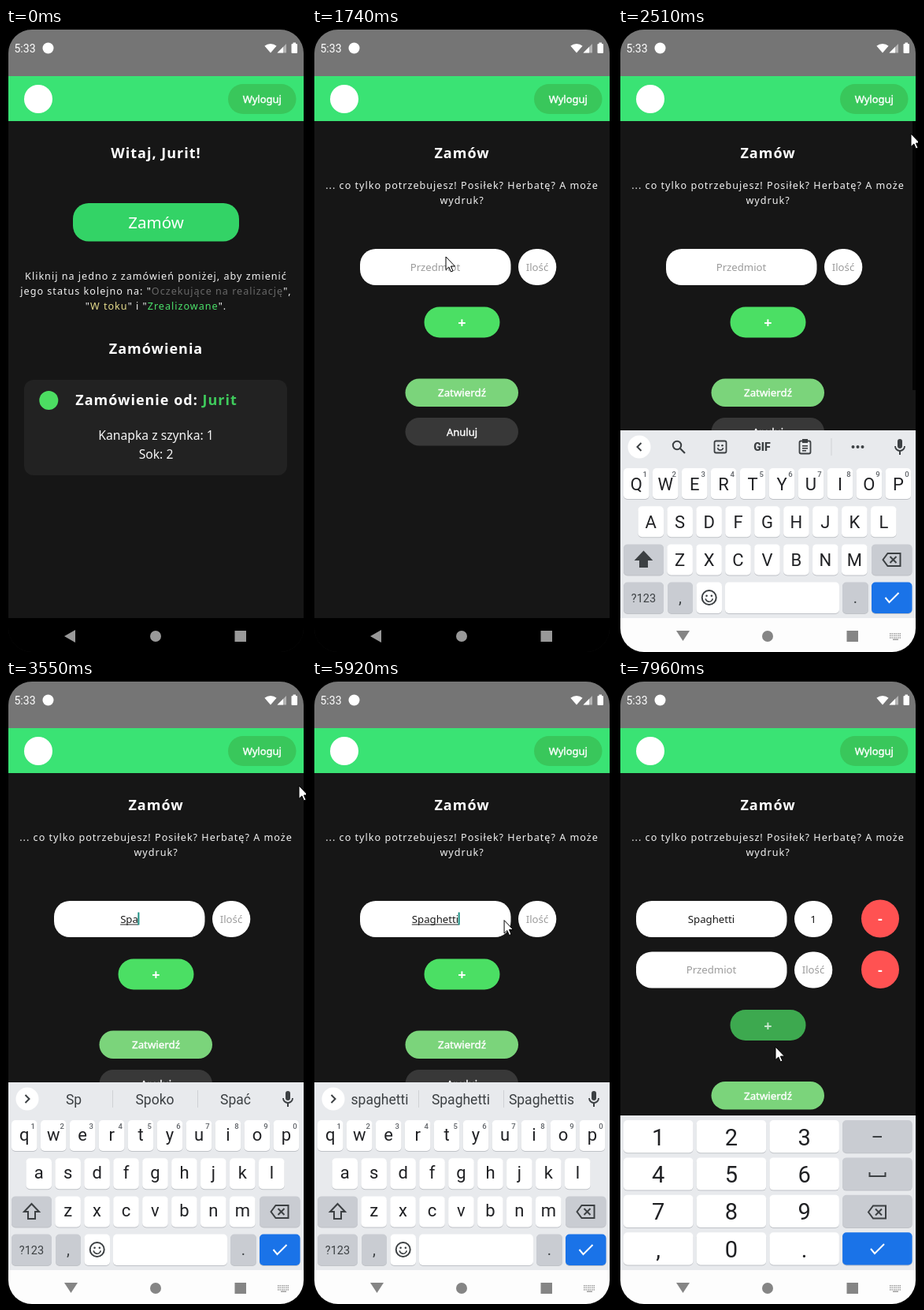
An HTML page with a canvas for the animation above (7.99 s loop, 381 by 791 pixels).

```html
<!DOCTYPE html>
<html lang="pl">
<head>
<meta charset="utf-8">
<style>
html, body { margin: 0; width: 100%; height: 100%; overflow: hidden; background: #000; }
canvas { display: block; width: 381px; height: 791px; }
</style>
</head>
<body>
<canvas id="stage"></canvas>
<script>
const W = 381, H = 791, LOOP = 7990, MID = 190.5;
const canvas = document.getElementById('stage');
const ctx = canvas.getContext('2d');
const dpr = window.devicePixelRatio || 1;
canvas.width = W * dpr;
canvas.height = H * dpr;

const APP = '"Noto Sans", sans-serif', SYS = 'Roboto, sans-serif';
const DARK = '#161616', GREEN = '#3ae374', INK = '#3c4043', USER = 'Jurit';
const TOP = 118, BOTTOM = 748, CENTER = (TOP + BOTTOM) / 2;

const ramp = (t, a, b) => Math.min(1, Math.max(0, (t - a) / (b - a)));
const smooth = p => p * p * (3 - 2 * p);
const easeOut = p => 1 - (1 - p) ** 3;
// Last entry of [time, ...values] that has started
const current = (list, t) => list.filter(e => t >= e[0]).pop();

function rect(x, y, w, h, color) {
  ctx.fillStyle = color;
  ctx.fillRect(x, y, w, h);
}

function pill(x, y, w, h, r, color) {
  ctx.fillStyle = color;
  ctx.beginPath();
  ctx.roundRect(x, y, w, h, r);
  ctx.fill();
}

function disc(x, y, r, color) {
  ctx.fillStyle = color;
  ctx.beginPath();
  ctx.arc(x, y, r, 0, 7);
  ctx.fill();
}

function shape(points, fill, stroke, width = 1.6, close = true) {
  ctx.beginPath();
  points.forEach(([x, y]) => ctx.lineTo(x, y));
  if (close) ctx.closePath();
  if (fill) { ctx.fillStyle = fill; ctx.fill(); }
  if (stroke) { ctx.strokeStyle = stroke; ctx.lineWidth = width; ctx.stroke(); }
}

function setFont(size, { weight = 400, font = APP, gap = 0 } = {}) {
  ctx.font = `${weight} ${size}px ${font}`;
  ctx.letterSpacing = gap + 'px';
}

// Draws one centred line made of [text, color] parts
function line(parts, x, y, size, style = {}) {
  setFont(size, style);
  const widths = parts.map(([s]) => ctx.measureText(s).width);
  const total = widths.reduce((a, b) => a + b, 0);
  let left = x - total / 2;
  parts.forEach(([s, color], i) => {
    ctx.fillStyle = ctx.strokeStyle = color;
    ctx.fillText(s, left, y);
    if (style.medium) {
      ctx.lineWidth = 0.4;
      ctx.strokeText(s, left, y);
    }
    left += widths[i];
  });
  return total;
}

const text = (s, x, y, size, color, style) => line([[s, color]], x, y, size, style);
const title = (s, y) => text(s, MID, y, 18, '#fff', { weight: 700, gap: 1 });
const body = (parts, y) => line(parts, MID, y, 12.6, { gap: 1 });

function scene(scale, alpha, draw) {
  if (alpha <= 0) return;
  ctx.save();
  ctx.globalAlpha *= alpha;
  ctx.translate(MID, CENTER);
  ctx.scale(scale, scale);
  ctx.translate(-MID, -CENTER);
  rect(3, TOP, 375, BOTTOM - TOP, DARK);
  draw();
  ctx.restore();
}

function dimmed(alpha, draw) {
  ctx.save();
  ctx.globalAlpha *= alpha;
  draw();
  ctx.restore();
}

function homeScreen(t) {
  title(`Witaj, ${USER}!`, 165);
  dimmed(1 - 0.67 * ramp(t, 590, 760), () => {
    pill(85, 222, 211, 48.5, 20, '#33d366');
    text('Zamów', MID, 254, 20.5, '#fff');
  });
  const c = '#f2f2f2';
  body([['Kliknij na jedno z zamówień poniżej, aby zmienić', c]], 318.5);
  body([['jego status kolejno na: "', c], ['Oczekujące na realizację', '#686868'], ['",', c]], 337.5);
  body([['"', c], ['W toku', '#e6dc8c'], ['" i "', c], ['Zrealizowane', '#4be06a'], ['".', c]], 356.5);
  title('Zamówienia', 412.5);
  pill(23, 446, 334, 121, 12, '#222');
  disc(54.3, 472, 12, '#4cdd62');
  line([['Zamówienie od: ', '#fff'], [USER, '#3fcb5c']], 191, 478, 18, { weight: 700, gap: 1 });
  text('Kanapka z szynka: 1', MID, 521.5, 15.7, '#f6f6f6');
  text('Sok: 2', MID, 546, 15.7, '#f6f6f6');
}

const WORD = 'Spaghetti';
const STROKES = [3000, 3290, 3550, 3850, 4050, 4230, 4340, 4770, 5150];

function field(value, hint, x, y, caret, underline) {
  if (!value) text(hint, x, y, 13.2, '#9c9c9c');
  const w = value ? text(value, x, y, 13.2, '#1a1a1a') : 0;
  if (underline) rect(x - w / 2, y + 2, w, 1, '#222');
  if (caret) rect(x + w / 2 - 0.5, y - 13, 2, 16, '#1b8f83');
}

function orderRow(y, dx, item, count, focus) {
  pill(61 + dx, y, 191.5, 46, 20, '#fff');
  pill(262 + dx, y, 48.3, 46, 23, '#fff');
  field(item, 'Przedmiot', 156.5 + dx, y + 27.5, focus === 'item', focus === 'item');
  field(count, 'Ilość', 286 + dx, y + 27.5, focus === 'count');
  if (!dx) return;
  disc(333, y + 22.5, 24, '#ff5252');
  text('-', 333, y + 29, 18, '#fff', { weight: 700 });
}

function orderScreen(t) {
  const added = t >= 7780;
  const dx = added ? -38 : 0, dy = added ? 64.5 : 0;
  title('Zamów', 165);
  body([['... co tylko potrzebujesz! Posiłek? Herbatę? A może', '#f2f2f2']], 204);
  body([['wydruk?', '#f2f2f2']], 223);

  const typed = WORD.slice(0, STROKES.filter(s => t >= s).length);
  const focus = t >= 6450 && t < 7240 ? 'count' : typed && t < 6450 ? 'item' : '';
  orderRow(280, dx, typed, t >= 7120 ? '1' : '', focus);
  if (added) orderRow(344.5, dx, '', '', '');

  const press = ramp(t, 7600, 7740) - ramp(t, 7800, 8050);
  dimmed(1 - 0.75 * press, () => {
    pill(142.5, 353.5 + dy, 96, 39, 19.5, '#4bdf64');
    text('+', MID, 380 + dy, 18, '#fff', { weight: 700 });
  });
  pill(118.5, 444.5 + dy, 143.5, 35.5, 17.7, '#7bd47b');
  text('Zatwierdź', MID, 467 + dy, 13.3, '#fff', { medium: true });
  pill(118.5, 494 + dy, 143.5, 35.5, 17.7, '#383838');
  text('Anuluj', MID, 517 + dy, 13, '#fff', { medium: true });
}

function statusBar() {
  rect(3, 0, 375, 61, '#757575');
  text('5:33', 24, 31, 14, '#fff', { font: SYS });
  disc(53.5, 25.5, 7, '#fff');
  ctx.fillStyle = '#fff';
  ctx.beginPath();
  ctx.moveTo(336, 31.5);
  ctx.arc(336, 31.5, 11.5, -Math.PI * 0.73, -Math.PI * 0.27);
  ctx.fill();
  shape([[344.5, 31.5], [356, 31.5], [356, 20]], '#b4b4b4');
  shape([[344.5, 31.5], [352, 31.5], [352, 24]], '#fff');
  pill(362.5, 20, 7.5, 12, 1, '#fff');
  rect(364.5, 18.5, 3.5, 2, '#fff');
}

function header() {
  rect(3, 61, 375, TOP - 61, GREEN);
  disc(41, 90, 18, '#fff');
  pill(282, 71, 86.5, 38, 19, '#39c75b');
  text('Wyloguj', 325.3, 95, 13, '#fff', { medium: true });
}

function navBar(light) {
  const c = light ? '#858585' : '#999';
  rect(3, BOTTOM, 375, H - BOTTOM, light ? '#fdfdfd' : '#000');
  shape(light ? [[74, 764], [91, 764], [82.5, 777]] : [[74, 771], [88, 763], [88, 779]], c);
  disc(190, 771, 7, c);
  rect(290.5, 764, 14.5, 14, c);
  if (!light) return;
  for (let row = 0; row < 3; row++)
    for (let i = 0; i < 6; i++) rect(345 + i * 2.5, 767 + row * 2.6, 1.5, 1.5, '#999');
  rect(349, 774.5, 7, 1.4, '#999');
}

function key(x, y, w, h, color) {
  pill(x, y + 1, w, h, 5, '#bfc2c7');
  pill(x, y, w, h, 5, color);
}

function backspace(x, y) {
  shape([[x - 11, y], [x - 5, y - 8], [x + 11, y - 8], [x + 11, y + 8], [x - 5, y + 8]], null, INK, 2);
  shape([[x - 2, y - 4], [x + 6, y + 4]], null, INK, 2, false);
  shape([[x + 6, y - 4], [x - 2, y + 4]], null, INK, 2, false);
}

const tick = (x, y) => shape([[x - 8, y], [x - 3, y + 6], [x + 9, y - 6]], null, '#fff', 2, false);

function ring(x, y, r, width = 2, from = 0, to = 7) {
  ctx.strokeStyle = INK;
  ctx.lineWidth = width;
  ctx.beginPath();
  ctx.arc(x, y, r, from, to);
  ctx.stroke();
}

function smiley(x, y, r) {
  disc(x - r * 0.35, y - r * 0.25, 1.3, INK);
  disc(x + r * 0.35, y - r * 0.25, 1.3, INK);
  ring(x, y + 0.5, r * 0.52, 1.7, 0.2, 2.94);
}

function box(x, y, w, h) {
  ctx.strokeStyle = INK;
  ctx.lineWidth = 1.8;
  ctx.beginPath();
  ctx.roundRect(x, y, w, h, 2);
  ctx.stroke();
}

function mic(x, y) {
  pill(x - 3, y - 10, 6, 12, 3, INK);
  ring(x, y - 1, 6, 1.8, 0, Math.PI);
  rect(x - 1, y + 5, 2, 5, INK);
}

function toolbar() {
  ring(75, 529, 5.2);
  shape([[79, 533], [85, 539]], null, INK, 2.2, false);
  box(122.5, 523.5, 15, 15);
  smiley(130, 531, 7);
  text('GIF', 183, 536, 14, INK, { weight: 900, font: SYS });
  box(230.5, 523.5, 14, 16);
  rect(234, 521, 7, 5, INK);
  rect(234, 529, 7, 1.6, INK);
  rect(234, 532, 7, 1.6, INK);
  rect(234, 535, 5, 1.6, INK);
  rect(270.5, 520, 1, 22, '#cfd1d5');
  [298.5, 304.5, 310.5].forEach(x => disc(x, 531, 2, INK));
}

const HINTS = [
  [3000, 'S', 'Się', 'Są'],
  [3340, 'Sp', 'Spoko', 'Spać'],
  [3670, 'Spa', 'Spać', 'Spacer'],
  [3950, 'Spag', 'Spaghetti', 'Spaghettis'],
  [4290, 'Spagh', 'Spaghetti', 'Spaghettis'],
  [4560, 'Spaghet', 'Spaghetti', 'Spaghettis'],
  [4900, 'Spaghett', 'Spaghetti', 'Spaghettis'],
  [5170, 'spaghetti', 'Spaghetti', 'Spaghettis']
];

function suggestions(t) {
  const [, ...words] = current(HINTS, t);
  words.forEach((w, i) => text(w, [86, 189, 291.5][i], 538, 17.5, INK, { font: SYS }));
  rect(135, 520, 1, 22, '#cfd1d5');
  rect(243, 520, 1, 22, '#cfd1d5');
}

function letterKeyboard(t) {
  const upper = t < 3000, grey = '#c9ccd2';
  rect(3, 510, 375, 240, '#e8eaed');
  disc(27, 531, 14.5, '#fff');
  const d = upper ? 1 : -1;
  shape([[27 + d * 2.5, 526], [27 - d * 2.5, 531], [27 + d * 2.5, 536]], null, INK, 2, false);
  upper ? toolbar() : suggestions(t);
  mic(358, 531);

  ['qwertyuiop', 'asdfghjkl', 'zxcvbnm'].forEach((row, r) => {
    [...row].forEach((ch, i) => {
      const x = [23.3, 41.7, 78.6][r] + i * 36.95, y = 558 + r * 48.2;
      key(x - 16.3, y, 32.6, 39, '#fff');
      text(upper ? ch.toUpperCase() : ch, x, y + (upper ? 27.5 : 25.5), 22, '#202124', { font: SYS });
      if (!r) text(String((i + 1) % 10), x + 11, y + 10.5, 9.5, '#5f6368', { font: SYS, weight: 500 });
    });
  });

  key(7, 654.4, 51, 39, grey);
  shape([[32.5, 664], [42, 674], [37, 674], [37, 683], [28, 683], [28, 674], [23, 674]],
    upper ? INK : null, INK, 2);
  key(322, 654.4, 51.5, 39, grey);
  backspace(347.5, 674);

  key(7, 702.6, 51, 39.4, grey);
  text('?123', 32.5, 727.5, 14.5, INK, { font: SYS });
  key(63, 702.6, 32, 39.4, grey);
  text(',', 79, 729, 20, INK, { font: SYS });
  key(99.5, 702.6, 32.5, 39.4, '#fff');
  ring(115.7, 722, 9);
  smiley(115.7, 722, 9);
  key(136, 702.6, 145, 39.4, '#fff');
  key(285, 702.6, 33, 39.4, grey);
  text('.', 301.5, 729, 20, INK, { font: SYS });
  key(322, 702.6, 51.5, 39.4, '#1a73e8');
  tick(347.5, 722);
}

function numberKeyboard() {
  rect(3, 552, 375, 198, '#e8eaed');
  ['123–', '456 ', '789<', ',0.+'].forEach((row, r) => {
    [...row].forEach((ch, i) => {
      const x = 7 + i * 92.7, y = 558 + r * 47.4, cx = x + 44.2;
      key(x, y, 88.5, 41.2, i < 3 ? '#fff' : r === 3 ? '#1a73e8' : '#c9ccd2');
      if (i < 3) text(ch, cx, y + 31.5, 29, '#202124', { font: SYS });
    });
  });
  rect(323.5, 578, 11.5, 2, INK);
  shape([[319.5, 624], [319.5, 629], [339.5, 629], [339.5, 624]], null, INK, 2, false);
  backspace(329, 674.5);
  tick(329, 721);
}

function keyboard(t) {
  const rise = easeOut(ramp(t, 2020, 2300));
  if (!rise) return;
  if (t >= 6600) return numberKeyboard();
  ctx.save();
  ctx.translate(0, 238 * (1 - rise));
  letterKeyboard(t);
  ctx.restore();
}

const PATH = [
  [40, 345, -20], [300, 262, 130], [580, 200, 252], [820, 188, 322], [970, 188, 322],
  [1120, 197, 379], [1740, 170, 290], [1840, 170, 290], [2510, 372, 134],
  [5650, 372, 134], [6000, 225, 330], [6150, 205, 358], [6420, 285, 310],
  [6600, 285, 310], [6960, 262, 380], [7240, 205, 378], [7750, 198, 386], [7960, 200, 465]
];

function pointer(t) {
  if (t < 40) return;
  const a = current(PATH, t), b = PATH[PATH.indexOf(a) + 1] || a;
  const p = smooth(ramp(t, a[0], b[0] + (a === b)));
  const x = a[1] + (b[1] - a[1]) * p, y = a[2] + (b[2] - a[2]) * p;
  const arrow = [[0, 0], [0, 16.5], [3.8, 13], [6.4, 19], [9, 17.9], [6.4, 12], [11.5, 12]];
  shape(arrow.map(([u, v]) => [x + u, y + v]), '#fff', '#000', 1);
}

function render(t) {
  ctx.setTransform(dpr, 0, 0, dpr, 0, 0);
  rect(0, 0, W, H, '#000');
  ctx.save();
  ctx.beginPath();
  ctx.roundRect(3, 2, 375, 789, 30);
  ctx.clip();
  rect(3, 0, 375, H, DARK);
  statusBar();
  header();
  scene(1 + 0.1 * ramp(t, 1040, 1195), 1 - ramp(t, 1080, 1180), () => homeScreen(t));
  scene(0.87 + 0.13 * easeOut(ramp(t, 1110, 1500)), ramp(t, 1125, 1190), () => orderScreen(t));
  if (t >= 2200 && t < 2690) rect(374, TOP, 4, 341, '#040404');
  keyboard(t);
  navBar(t >= 2020);
  ctx.restore();
  pointer(t);
}

const start = performance.now();
function frame() {
  render((performance.now() - start) % LOOP);
  requestAnimationFrame(frame);
}
frame();
</script>
</body>
</html>
```
